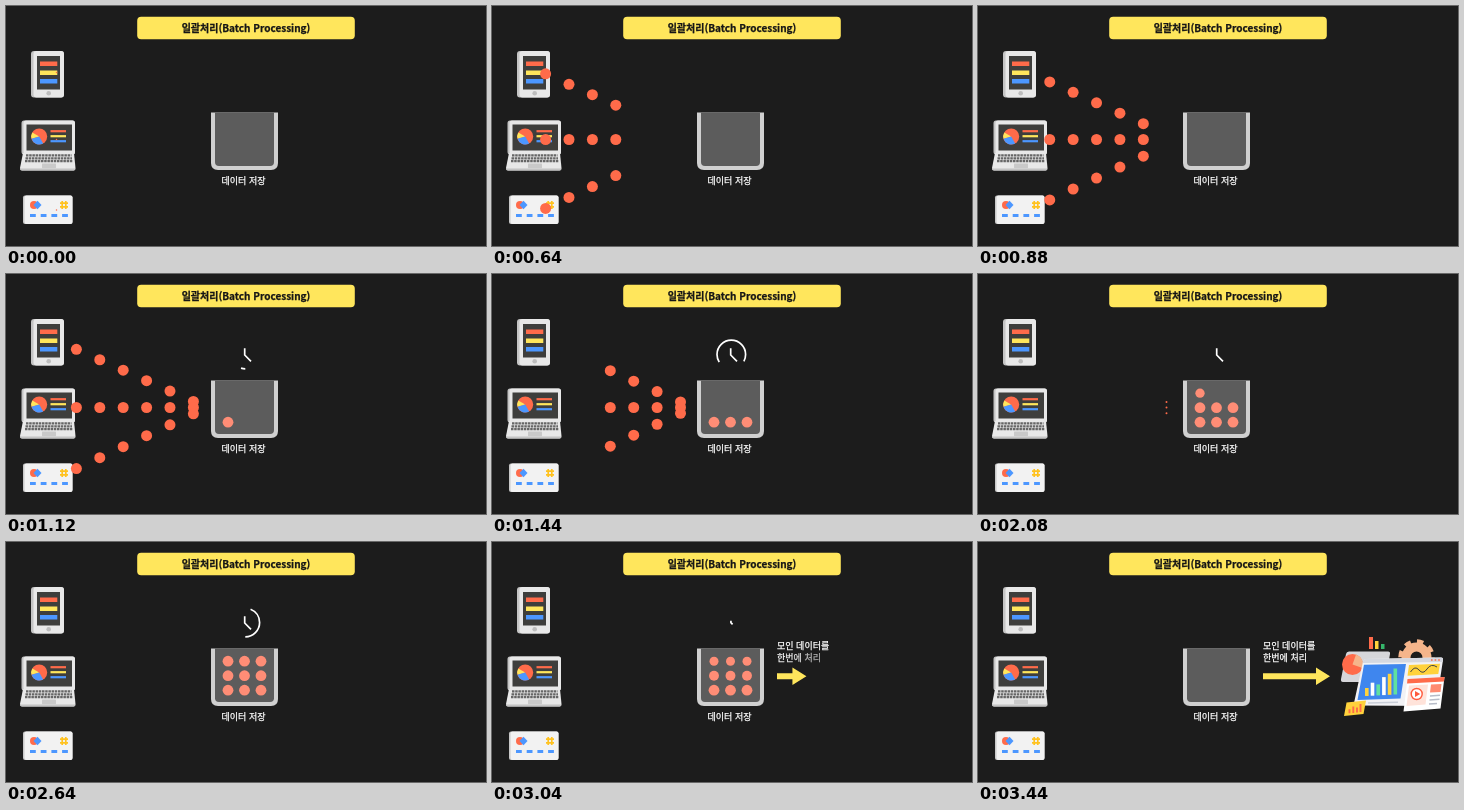
An HTML page that plays this animation: 480 px wide and 240 px high, repeating every 4000 ms.

```html
<!DOCTYPE html>
<html lang="ko">
<head>
<meta charset="utf-8">
<title>일괄처리</title>
<style>
html, body { margin: 0; width: 100%; height: 100%; overflow: hidden; background: #1c1c1c; }
svg { display: block; width: 100vw; height: 100vh; }
text { font: 500 9px "Noto Sans CJK KR", "Noto Sans KR", "Noto Sans CJK", "Noto Sans CJK JP", sans-serif; fill: #fff; stroke: #fff; stroke-width: .25; }
.title { font-weight: 700; font-size: 10px; fill: #161616; stroke: #161616; }
.mid { text-anchor: middle; }
</style>
</head>
<body>
<svg viewBox="0 0 480 240">
  <rect width="480" height="240" fill="#1c1c1c"/>
  <rect x="131.2" y="10.7" width="217.6" height="22.6" rx="4" fill="#ffe65c"/>
  <text class="title mid" x="240" y="25.8">일괄처리(Batch Processing)</text>

  <g id="tablet">
    <rect x="25" y="45" width="33" height="46.5" rx="3" fill="#c4c4c4"/>
    <rect x="27.5" y="45" width="30.5" height="46.5" rx="3" fill="#e8e8e8"/>
    <rect x="31" y="50" width="23" height="33.5" fill="#3e3e3c"/>
    <rect x="34" y="55.5" width="17.3" height="4.5" fill="#ff6b4a"/>
    <rect x="34" y="64.5" width="17.3" height="4.5" fill="#ffe65c"/>
    <rect x="34" y="73" width="17.3" height="4.5" fill="#4c97ff"/>
    <circle cx="42.7" cy="87.2" r="2.3" fill="#bdbdbd"/>
  </g>

  <g id="laptop">
    <rect x="15.5" y="114.5" width="53.5" height="34" rx="2.5" fill="#c4c4c4"/>
    <rect x="17.5" y="114.5" width="51.5" height="34" rx="2.5" fill="#e8e8e8"/>
    <rect x="20.5" y="118.5" width="45.5" height="26" fill="#3e3e3c"/>
    <circle cx="33.2" cy="130.5" r="8" fill="#ff6b4a"/>
    <path d="M33.2 130.5L26.3 126.5A8 8 0 0 0 25.5 132.7Z" fill="#ffe65c"/>
    <path d="M33.2 130.5L25.5 132.7A8 8 0 0 0 37.2 137.4Z" fill="#4c97ff"/>
    <path d="M44.5 125.2h15.5" stroke="#ff6b4a" stroke-width="2.2"/>
    <path d="M44.5 130.2h15.5" stroke="#ffe65c" stroke-width="2.2"/>
    <path d="M44.5 135.2h15.5" stroke="#4c97ff" stroke-width="2.2"/>
    <path d="M17 147H68L69.5 162Q69.5 164.5 67.5 164.5H16Q14 164.5 14 162Z" fill="#e8e8e8"/>
    <path d="M14 162.5H69.5Q69.5 164.5 67.5 164.5H16Q14 164.5 14 162.5Z" fill="#c4c4c4"/>
    <path d="M20 149.4H65.5M19.5 152.3H66M19 155.2H66.5" stroke="#666" stroke-width="2.2" stroke-dasharray="2.5 .7"/>
    <rect x="36" y="157.6" width="14" height="4.6" rx=".6" fill="#c9c9c9"/>
  </g>

  <g id="card">
    <rect x="17" y="189.5" width="49.5" height="28.5" rx="2" fill="#c9c9c9"/>
    <rect x="18.5" y="189.5" width="48" height="28.5" rx="2" fill="#f2f2f2"/>
    <circle cx="28" cy="199" r="4" fill="#ff6b4a"/>
    <path d="M31.5 194.8l4 4.2-4 4.2-4-4.2z" fill="#4c97ff"/>
    <path d="M54 197.2h8M54 200.8h8M56.2 195v8M59.8 195v8" stroke="#ffc21f" stroke-width="1.7"/>
    <path d="M24 209.5H62" stroke="#4c97ff" stroke-width="3" stroke-dasharray="5.8 4.9"/>
  </g>

  <path d="M205 106.5H272V157Q272 164 265 164H212Q205 164 205 157Z" fill="#d0d0d0"/>
  <path d="M209 106.5H268V156Q268 160 264 160H213Q209 160 209 156Z" fill="#5c5c5c"/>
  <text class="mid" x="237.5" y="178">데이터 저장</text>

  <g id="stored"></g>
  <g id="flow"></g>

  <g fill="none" stroke="#fff" stroke-width="1.7">
    <circle id="ring" cx="239.3" cy="80.5" r="14.3" pathLength="100" transform="rotate(90 239.3 80.5)"/>
    <path id="hands" d="M238.7 74.3V81L245 87.3" vector-effect="non-scaling-stroke"/>
  </g>

  <path id="arrow" fill="#ffe65c"/>
  <text id="line1" x="285" y="106.6"></text>
  <text id="line2" x="285" y="119.2"></text>

  <g id="report">
    <rect x="391" y="95" width="4" height="12" fill="#ff6b4a"/>
    <rect x="397" y="99" width="3.5" height="8" fill="#ffd23c"/>
    <rect x="403" y="102" width="3.5" height="5" fill="#35b56a"/>
    <g fill="none" stroke="#f5b58b">
      <circle cx="438.5" cy="115.5" r="10.5" stroke-width="9"/>
      <circle cx="438.5" cy="115.5" r="16" stroke-width="4.5" stroke-dasharray="6.3 6.27"/>
    </g>
    <path d="M371 109.5H410Q412.5 109.5 412 112L407 140H365Q362.5 140 363 137L368 112Q368.5 109.5 371 109.5Z" fill="#d6d6da"/>
    <circle cx="374.5" cy="122.5" r="10.5" fill="#ff6b4a"/>
    <path d="M374.5 122.5L378 112.6A10.5 10.5 0 0 1 384.5 126Z" fill="#f5b58b"/>
    <path d="M388 117L463 115.5Q465.5 115.5 465 118L458 164L379 163.5Q375.5 163.5 376 161L385 119.5Q385.5 117 388 117Z" fill="#f2f2f5"/>
    <path d="M385.4 118.5Q386 117 388 117L463 115.5Q465.5 115.5 465 118L464.5 120L384.7 121Z" fill="#d5d8e0"/>
    <path d="M453 118h9" stroke="#ff6b4a" stroke-width="1.6" stroke-dasharray="1.6 2"/>
    <path d="M386 122.7L428 122L422.5 156.5L379.5 158Z" fill="#3f86ee"/>
    <g id="bars"></g>
    <path d="M431 123L462 121.7L460.3 132L429.5 133.7Z" fill="#ffd23c"/>
    <path d="M432.5 130Q437 123 441 128T449 127T459 125" fill="none" stroke="#444" stroke-width="1"/>
    <path d="M390 161L420 160.3" stroke="#c9ced8" stroke-width="1.4"/>
    <path d="M429.5 137L466.5 135L462.5 166.5L425.5 169.5Z" fill="#fff"/>
    <path d="M429.5 137L466.5 135L466 139.5L429 141.5Z" fill="#ff6b4a"/>
    <path d="M431 143.5L450 142.4L447.5 162.5L428.5 164Z" fill="#ffe3da"/>
    <circle cx="438.7" cy="152" r="5.5" fill="#fff" stroke="#ff5a3c" stroke-width="1.4"/>
    <path d="M437 149L442.2 152L437 155Z" fill="#ff5a3c"/>
    <path d="M453 142.6L463.5 142L462.5 150L452 150.6Z" fill="#ff8a70"/>
    <path d="M452 154L462 153.3M451.5 158L461.5 157.3M451 162L459 161.4" stroke="#b7bcc8" stroke-width="1.5"/>
    <path d="M368.5 160.5L388 158.5L385.5 172L366 174Z" fill="#ffd23c"/>
    <path d="M371.5 171.3v-4M375.3 170.9v-6.5M379 170.5v-5M382.5 170.1v-8" stroke="#ff6b4a" stroke-width="1.9"/>
  </g>
</svg>
<script>
const LOOP = 4000, STEP = 80, LAST = 3440;
const X0 = 50.5, X1 = 188.5, GAP = 23.4;
// y at the jar end and slope of each stream
const STREAMS = [[128, -0.446], [133.5, 0], [139.3, 0.468]];
const $ = id => document.getElementById(id);
const ramp = (t, a, b) => Math.min(1, Math.max(0, (t - a) / (b - a)));
const mix = (a, b, p) => a + (b - a) * p;
const easeOut = p => 1 - (1 - p) ** 3;
const easeInOut = p => p < .5 ? 4 * p ** 3 : 1 - 4 * (1 - p) ** 3;
const sine = p => (1 - Math.cos(Math.PI * p)) / 2;

function add(parent, tag, attrs) {
  const el = document.createElementNS('http://www.w3.org/2000/svg', tag);
  for (const k in attrs) el.setAttribute(k, attrs[k]);
  return parent.appendChild(el);
}
function scale(el, s, x, y) {
  el.setAttribute('visibility', s > 0 ? 'visible' : 'hidden');
  el.setAttribute('transform', `translate(${x} ${y}) scale(${s}) translate(${-x} ${-y})`);
}

const stored = Array.from({ length: 9 }, (_, i) => add($('stored'), 'circle', {
  cx: 222 + i % 3 * 16.5, cy: 148.2 - Math.floor(i / 3) * 14.5, fill: '#ff8d76'
}));
const flow = STREAMS.map(() => Array.from({ length: 6 }, () => add($('flow'), 'circle', { fill: '#ff6b4a' })));
const chars = [['line1', '모인 데이터를'], ['line2', '한번에 처리']].flatMap(([id, s]) =>
  [...s].map(c => {
    const el = add($(id), 'tspan', {});
    el.textContent = c;
    return el;
  }));
[[8, '#ffd23c'], [13, '#fff'], [11, '#5fe0a0'], [18, '#fff'], [21, '#ffd23c'], [26, '#5fe0a0']].forEach(([h, fill], i) =>
  add($('bars'), 'rect', { x: 387 + i * 5.7, y: 154 - i * .3 - h, width: 3.6, height: h, fill }));

function drawFlow(t) {
  const lead = mix(X0, X1, sine(ramp(t, 50, 1185)));
  const tail = mix(X0, X1, sine(ramp(t, 960, 2100)));
  const r = 5.5 * ramp(t, -25, 160) * (1 - ramp(t, 1940, 2110));
  flow.forEach((row, j) => row.forEach((dot, k) => {
    const x = lead - k * GAP, [y, slope] = STREAMS[j];
    dot.setAttribute('cx', x);
    dot.setAttribute('cy', y + slope * (X1 - x));
    dot.setAttribute('r', x >= tail ? r : 0);
  }));
}

function drawStored(t) {
  stored.forEach((dot, i) => {
    const start = 980 + i * 172, leave = 3040 - Math.floor(i / 3) * 25;
    const size = easeOut(ramp(t, start, start + 140)) * (1 - ramp(t, leave, leave + 300));
    dot.setAttribute('r', 5.4 * size);
  });
}

function drawClock(t) {
  const grow = easeOut(ramp(t, 980, 1110)), shrink = ramp(t, 2900, 3090);
  scale($('hands'), grow * (1 - shrink), 239, 80.5);
  const u = t < 2100 ? t : t - 1000;
  const head = 100 * ramp(u, 1100, 1510), tail = 100 * ramp(u, 1360, 1860);
  $('ring').setAttribute('visibility', head > tail ? 'visible' : 'hidden');
  $('ring').setAttribute('stroke-dasharray', `0 ${tail} ${head - tail} 200`);
}

function drawArrow(t) {
  const s = easeOut(ramp(t, 2640, 2800));
  const tip = 285 + mix(16, 67, easeInOut(ramp(t, 2830, 3350)));
  const neck = tip - 14;
  $('arrow').setAttribute('d',
    `M285 131.2H${neck}V125.5L${tip} 134.2L${neck} 143V137.2H285Z`);
  scale($('arrow'), s, 285, 134.2);
}

function drawText(t) {
  chars.forEach((c, i) => {
    const alpha = ramp(t, 2770 + i * 14, 2950 + i * 14);
    c.setAttribute('fill-opacity', alpha);
    c.setAttribute('stroke-opacity', alpha);
  });
}

function draw(t) {
  drawFlow(t);
  drawStored(t);
  drawClock(t);
  drawArrow(t);
  drawText(t);
  scale($('report'), easeOut(ramp(t, 3110, 3440)), 414, 136);
}

const begin = performance.now();
function tick() {
  const t = (performance.now() - begin) % LOOP;
  draw(Math.min(LAST, Math.floor(t / STEP) * STEP));
  requestAnimationFrame(tick);
}
tick();
</script>
</body>
</html>
```
